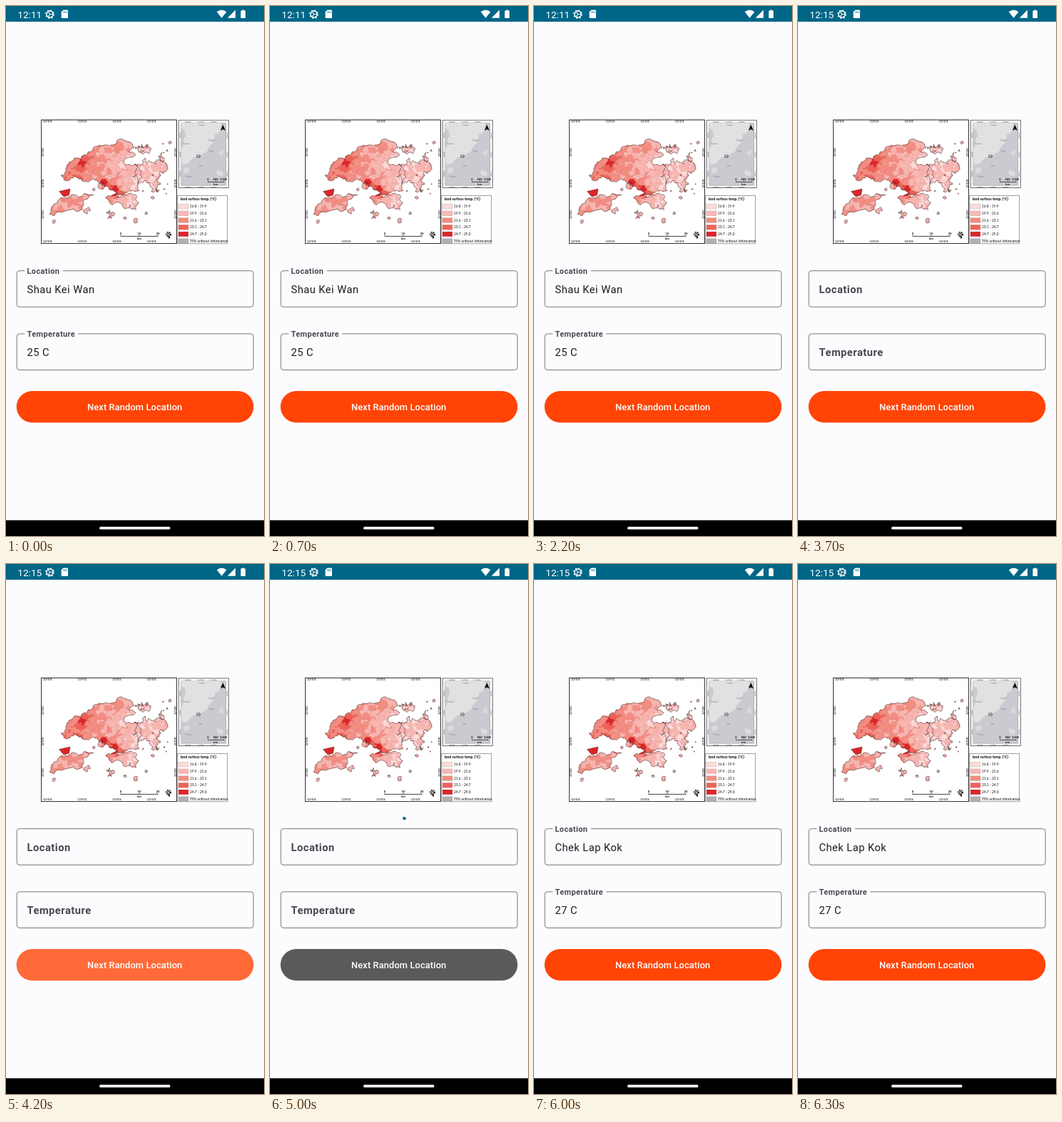
An HTML page for the animation above (8000 ms loop, 362x742 px).

```html
<!DOCTYPE html>
<html lang="en">
<head>
<meta charset="utf-8">
<title>Random location</title>
<style>
html, body { margin: 0; width: 100%; height: 100%; overflow: hidden; background: #fcfcff; }
svg { display: block; width: 100vw; height: 100vh; font-family: Roboto, sans-serif; }
.map text { font-family: Lato, "Open Sans", sans-serif; }
</style>
</head>
<body>
<svg viewBox="0 0 362 742">
  <defs>
    <clipPath id="buttonClip"><rect x="14.7" y="539" width="332.7" height="44.2" rx="22.1"/></clipPath>
    <clipPath id="insetClip"><rect x="246" y="164" width="62.5" height="87"/></clipPath>
    <clipPath id="landClip"></clipPath>
    <radialGradient id="soft"><stop offset=".8" stop-color="#fff"/><stop offset="1" stop-color="#fff" stop-opacity="0"/></radialGradient>
  </defs>
  <rect width="362" height="742" fill="#fcfcff"/>

  <rect width="362" height="22" fill="#006687"/>
  <text id="clock" x="16.2" y="16.6" font-size="13.7" fill="#fff"></text>
  <g fill="none" stroke="#fff">
    <circle cx="61.5" cy="11.5" r="4.5" stroke-width="1.5"/>
    <circle cx="61.5" cy="11.5" r="5.7" stroke-width="1.4" stroke-dasharray="2 2.48"/>
    <path d="M61.5 11.5h4M61.5 11.5l-2.3 3.8M61.5 11.5l-2.3-3.8" stroke-width="1.1"/>
  </g>
  <path d="M80.5 5.6H86a1 1 0 0 1 1 1V16a1 1 0 0 1-1 1H78.6a1 1 0 0 1-1-1V8.6z" fill="#fff"/>
  <path d="M81 7.4v2.4M83 7.4v2.4M85 7.4v2.4" stroke="#006687" stroke-width=".9"/>
  <path d="M295.8 8.2Q302.6 2.8 309.4 8.2L302.6 16.8ZM322 5.6V16.8H310.8ZM331.3 5.4h2.8v1.2h1.9v10.3h-6.6V6.6h1.9z" fill="#fff"/>

  <g class="map">
    <path d="M49 159h264v175H49z" fill="#fff"/>
    <rect x="49.5" y="159.5" width="190" height="173" fill="none" stroke="#333"/>
    <g id="land"></g>
    <g font-size="4.2" font-weight="700" text-anchor="middle">
      <text x="161" y="319.6">0</text><text x="187" y="319.6">10</text><text x="213" y="319.6">20</text>
      <text x="187" y="327.4">km</text>
    </g>
    <path d="M161 320.8v1.6h52v-1.6M187 320.8v1.6" fill="none" stroke="#111" stroke-width=".8"/>
    <circle cx="228" cy="319.7" r="2.3" fill="none" stroke="#222" stroke-width="3.2" stroke-dasharray="1.3 .76"/>
    <path d="M227 322l3.6 1-1.8 3.4z" fill="#222"/>

    <rect x="242.3" y="160" width="70" height="94.5" fill="#fff" stroke="#444" stroke-width=".8"/>
    <rect x="245.8" y="163.9" width="63" height="87.2" fill="#cbcad0" stroke="#777" stroke-width=".4"/>
    <g id="coast" clip-path="url(#insetClip)"></g>
    <g font-size="3" fill="#8b8b92" text-anchor="middle">
      <text x="275" y="168.4">Hubei</text><text x="288" y="189">Jiangxi</text><text x="253" y="194.3">Guizhou</text>
      <text x="288" y="204">Fujian</text><text x="273" y="224.8">Sea</text><text x="257" y="240">Hainan</text>
    </g>
    <path d="M268 208.9h4.2v3h-4.2z" fill="none" stroke="#222" stroke-width=".7"/>
    <path d="M304.4 166.2l3.5 8.2-3.5-2-3.5 2z"/>
    <g font-size="4" font-weight="700" text-anchor="middle">
      <text x="283.4" y="244.2">0</text><text x="294" y="244.2">500</text><text x="305" y="244.2">1,000</text>
      <text x="294" y="251">km</text>
    </g>
    <path d="M283.4 245v1.4H306V245M294.5 245v1.4" fill="none" stroke="#111" stroke-width=".7"/>

    <rect x="240.8" y="265.5" width="69.8" height="67.3" fill="#fff" stroke="#777" stroke-width=".7"/>
    <text x="244.8" y="272.2" font-size="5" font-weight="700">land surface temp. (°C)</text>
    <g id="legend" font-size="4.9" fill="#111"></g>
    <g id="ticks" font-weight="700" fill="#222" text-anchor="middle"></g>
  </g>

  <g id="fields"></g>

  <g clip-path="url(#buttonClip)">
    <rect id="button" x="14" y="538" width="334" height="46"/>
    <circle id="ripple" cx="181" cy="561" fill="url(#soft)" opacity=".205"/>
  </g>
  <text x="180.7" y="566" font-size="12.9" font-weight="500" letter-spacing=".09" text-anchor="middle" fill="#fff">Next Random Location</text>
  <path id="spinner" fill="none" stroke="#006687" stroke-width="3.7"/>

  <rect y="720" width="362" height="22" fill="#000"/>
  <rect x="131" y="729" width="99.5" height="3.8" rx="1.9" fill="#f4f4f4"/>
</svg>
<script>
const $ = id => document.getElementById(id);
const shades = ['#fddbd9', '#f9b7b2', '#f48d82', '#ee6357', '#dc2529'];

function make(parent, tag, attrs, text = '') {
  const el = document.createElementNS('http://www.w3.org/2000/svg', tag);
  for (const k in attrs) el.setAttribute(k, attrs[k]);
  el.textContent = text;
  parent.append(el);
  return el;
}

let seed = 4711;
const rnd = () => (seed = (seed * 16807 + 11) % 2147483647) / 2147483647;
const spread = k => (rnd() - .5) * 2 * k;
const parse = s => s.split(' ').map(p => p.split(',').map(Number));

// Closed outline through key points, roughened by midpoint displacement.
function rough(ring, amount, depth) {
  while (depth--) {
    ring = ring.flatMap((a, i) => {
      const b = ring[(i + 1) % ring.length], k = spread(amount);
      return [a, [(a[0] + b[0]) / 2 + (b[1] - a[1]) * k, (a[1] + b[1]) / 2 - (b[0] - a[0]) * k]];
    });
  }
  return 'M' + ring.map(p => p.map(v => v.toFixed(1))).join('L') + 'Z';
}

function blob(x, y, rx, ry = rx, n = 6) {
  return Array.from({ length: n }, (_, i) => {
    const a = (i + rnd() * .7) / n * Math.PI * 2, k = .75 + rnd() * .5;
    return [x + Math.cos(a) * rx * k, y + Math.sin(a) * ry * k];
  });
}

// Cooler to the east and south, with a few warm and cool centres.
function heat(x, y) {
  const bump = (cx, cy, r, k) => k * Math.exp(-((x - cx) ** 2 + (y - cy) ** 2) / (r * r));
  const east = Math.min(1, Math.max(0, (x - 120) / 70));
  return 2 - 1.4 * east - (y > 262 ? .4 : 0)
    + bump(106, 221, 9, 2.2) + bump(153, 257, 9, 3.2) + bump(137, 245, 6, 2)
    + bump(147, 268, 8, 1.6) + bump(156, 200, 12, .8) + bump(150, 215, 10, -1);
}

function drawLand() {
  const mainland = '77,237 84,227 96,213 107,210 124,197 137,195 156,188 173,190 180,198 173,205 182,208 166,215 169,223 182,222 190,240 187,258 170,261 160,265 145,257 129,246 119,243 110,246 88,244';
  const peninsula = '180,222 194,213 206,220 219,205 217,217 223,232 215,241 216,251 204,260 201,247 186,250 178,238';
  const island = '140,268 151,264 170,264 186,275 183,285 174,278 168,284 150,278';
  const lantau = '61,291 64,281 80,269 92,264 111,262 123,264 108,275 107,284 99,288 90,285 68,293';
  const outlines = [
    rough(parse(mainland), .26, 4), rough(parse(peninsula), .5, 4),
    rough(parse(island), .35, 3), rough(parse(lantau), .28, 3),
    rough(blob(146, 291, 5, 7), .6, 3), rough(blob(134, 252, 5), .3, 2), rough(blob(191, 197, 8, 4), .8, 3)
  ];
  const isles = parse('114,287,4 182,301,3 167,297,2 206,268,2 197,290,2 123,257,2 67,302,2 230,191,2');
  for (let i = 0; i < 14; i++) isles.push([207 + spread(24), 228 + spread(38), .4 + rnd()]);
  const all = outlines.concat(isles.map(([x, y, r]) => rough(blob(x, y, r), .5, 2))).join('');

  make($('landClip'), 'path', { d: outlines.join('') });
  make($('land'), 'path', { d: all, fill: shades[1] });

  const districts = [];
  for (let y = 188; y < 300; y += 5)
    for (let x = 60; x < 226; x += 5) districts.push([rnd(), x + spread(2.5), y + spread(2.5)]);
  districts.sort((a, b) => a[0] - b[0]);
  const inside = make($('land'), 'g', { 'clip-path': 'url(#landClip)', stroke: '#a8635f', 'stroke-width': .1 });
  for (const [, x, y] of districts) {
    const shade = Math.min(4, Math.max(0, Math.round(heat(x, y) + spread(.65))));
    make(inside, 'path', { d: rough(blob(x, y, 5.5, 4.5), .35, 2), fill: shades[shade] });
  }
  make($('land'), 'path', { d: 'M74.5 259.5L90 256L88.5 265L81 267Z', fill: shades[4], stroke: '#5c1a1a', 'stroke-width': .5 });
  make($('land'), 'path', { d: all, fill: 'none', stroke: '#33191a', 'stroke-width': .5 });
}

function drawMapDetails() {
  const tick = (x, y, text, size, turn = 0) =>
    make($('ticks'), 'text', { transform: `translate(${x} ${y}) rotate(${turn})`, 'font-size': size }, text);
  for (let i = 0; i < 4; i++)
    for (const y of [163.4, 331.4]) tick(58.3 + i * 48.6, y, `113°${50 + i}'E`, 3.1);
  for (let i = 0; i < 3; i++) {
    for (const y of [163, 253.6]) tick(255 + i * 18, y, `11${i}°0'E`, 2.6);
    for (const x of [52.8, 238.6]) tick(x, 205 + i * 43.5, `22°${i + 1}0'N`, 3.1, -90);
    for (const x of [245, 311.3]) tick(x, 181 + i * 27, `2${i}°0'N`, 2.6, -90);
  }

  const shore = '240,160 302,160 302,174 290,193 276,207 262,213 251,222 240,220';
  make($('coast'), 'path', { d: rough(parse(shore), .2, 4), fill: '#e1e1e2' });
  for (const [x, y, r] of parse('302,205,4 254,229,5 300,234,5'))
    make($('coast'), 'path', { d: rough(blob(x, y, r), .3, 2), fill: '#dcdcde' });

  ['16.8 - 19.9', '19.9 - 21.6', '21.6 - 23.1', '23.1 - 24.7', '24.7 - 29.0', 'TPU without information'].forEach((label, i) => {
    const y = 277.2 + i * 9.7;
    make($('legend'), 'rect', { x: 242, y, width: 14, height: 6.8, fill: shades[i] || '#afafaf', stroke: '#888', 'stroke-width': .25 });
    make($('legend'), 'text', { x: 258, y: y + 5.1 }, label);
  });
}

function makeField(y, name, notchWidth) {
  const g = make($('fields'), 'g', { transform: `translate(0 ${y})` });
  make(g, 'rect', { x: 15.2, y: 0, width: 331.9, height: 50.6, rx: 3.7, fill: 'none', stroke: '#77777b' });
  const notch = make(g, 'rect', { x: 26.2, y: -1.5, height: 3, fill: '#fcfcff' });
  const label = make(g, 'text', { 'font-size': 14.7, 'font-weight': 700, 'letter-spacing': .5, fill: '#47474e' }, name);
  const value = make(g, 'text', { x: 29.5, y: 31.3, 'font-size': 14.7, 'letter-spacing': .46, fill: '#1b1b1f' });
  return (text, p) => {
    value.textContent = text;
    notch.setAttribute('width', notchWidth * p);
    label.setAttribute('transform', `translate(29.5 ${31.3 - 27.2 * p}) scale(${1 - .25 * p})`);
  };
}

// Material standard curve (0.4, 0, 0.2, 1).
function ease(x) {
  if (x <= 0 || x >= 1) return Math.min(1, Math.max(0, x));
  let lo = 0, hi = 1;
  for (let i = 0; i < 20; i++) {
    const s = (lo + hi) / 2, u = 1 - s;
    if (1.2 * s * u * u + .6 * s * s * u + s ** 3 < x) lo = s; else hi = s;
  }
  return 3 * lo * lo * (1 - lo) + lo ** 3;
}

function arc(ms) {
  const cycle = 1332, half = cycle / 2, t = ms % cycle;
  const base = -90 + 286 * t / cycle + 216 * Math.floor(ms / cycle);
  const tail = 290 * ease((t - half) / half), head = 290 * ease(t / half);
  const at = deg => {
    const a = deg * Math.PI / 180;
    return `${181 + 16.6 * Math.cos(a)} ${371 + 16.6 * Math.sin(a)}`;
  };
  return `M${at(base + tail)}A16.6 16.6 0 ${head - tail > 180 ? 1 : 0} 1 ${at(base + head)}`;
}

drawLand();
drawMapDetails();
const setLocation = makeField(370.7, 'Location', 53.5);
const setTemperature = makeField(458.9, 'Temperature', 75);

function render(time) {
  const t = Math.floor(time % 8000 / 100) * 100; // the picture steps ten times per second
  const before = t < 3000, loaded = t >= 5900, loading = t >= 5000 && !loaded;
  const pressed = t >= 3900 && t < 5000;
  const p = before ? 1 : loaded ? ease((t - 5850) / 150) : 0;

  $('clock').textContent = before ? '12:11' : '12:15';
  setLocation(before ? 'Shau Kei Wan' : loaded ? 'Chek Lap Kok' : '', p);
  setTemperature(before ? '25 C' : loaded ? '27 C' : '', p);
  $('button').setAttribute('fill', loading ? '#5b595b' : '#ff4405');
  $('ripple').setAttribute('r', pressed ? 60 + 160 * Math.min(1, (t - 3900) / 300) : 0);
  $('spinner').setAttribute('d', loading ? arc(t - 4910) : '');
}

const start = performance.now();
function tick() {
  render(performance.now() - start);
  requestAnimationFrame(tick);
}
tick();
</script>
</body>
</html>
```
